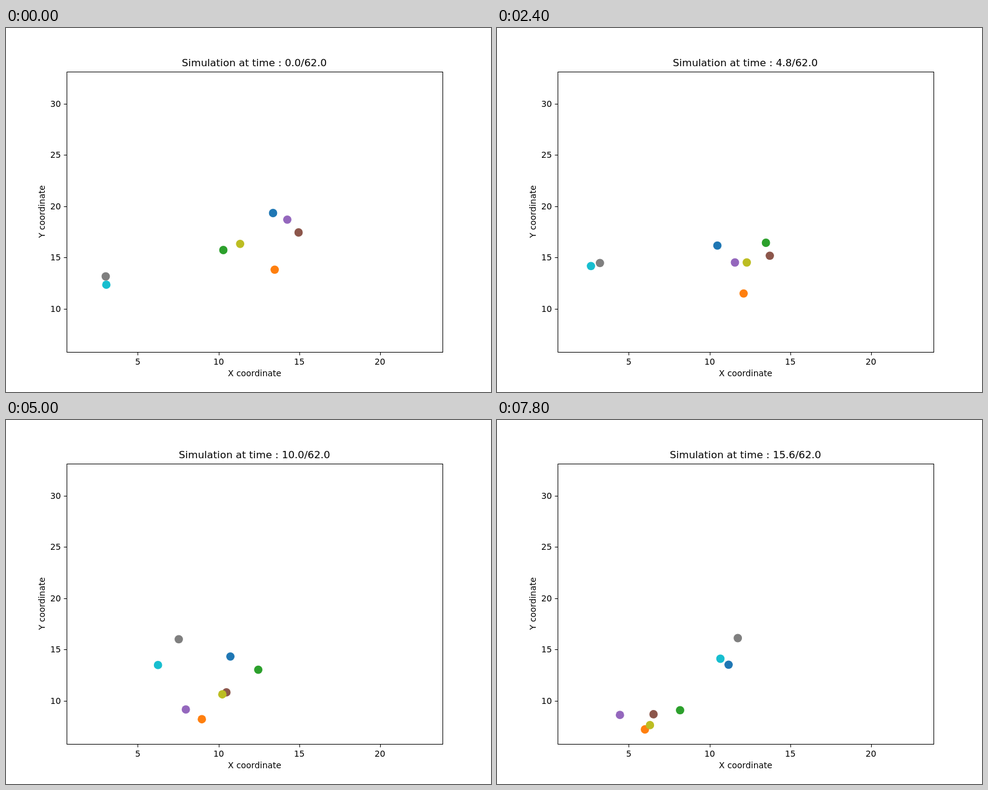
Write an HTML page that moves like this. It is 800 px wide and 600 px high and loops after 8000 ms.

```html
<!DOCTYPE html>
<html lang="en">
<head>
<meta charset="utf-8">
<title>Simulation</title>
<style>
  html, body { margin: 0; width: 100%; height: 100%; overflow: hidden; background: #fff; }
  svg { display: block; width: 800px; height: 600px; }
  text { font: 13.89px "DejaVu Sans", sans-serif; }
  .title { font-size: 16.67px; }
  .axis { fill: none; stroke: #000; }
</style>
</head>
<body>
<svg id="stage" viewBox="0 0 800 600"></svg>
<script>
const STEP_MS = 200, STEP_COUNT = 40, TIME_PER_STEP = 0.4;

// Every dot is at its waypoints at these steps and glides between them.
const WAYPOINT_STEPS = [0, 4, 12, 21, 33, 39];
const ROUTES = {
  '#1f77b4': '440.5,305 407.5,327 363.5,358.7 357.4,385 394,394.3 382,403.3',
  '#ff7f0e': '443.2,398.3 439.5,412 406.8,437.6 349.8,475.5 273.7,515.8 244,510',
  '#2ca02c': '358.5,366 400,356.5 443.6,354 439.2,389 349.5,455.5 302,478.4',
  '#9467bd': '464,315.8 444.5,336.5 392.5,386.5 332.2,447.7 227.8,511 202.8,486.2',
  '#8c564b': '482.6,337 479.2,340 450,375.3 397.5,424.3 293.2,486.2 258.2,485',
  '#7f7f7f': '164.5,409.5 136,396.5 169.8,387.3 241.7,368.6 368,355.6 397.2,359.5',
  '#bcbd22': '386.2,355.8 407.8,365.8 412,386.5 384.2,431.5 291,486.2 252.3,502.9',
  '#17becf': '165.5,423.2 127.7,404 155,392.3 211.8,399.2 333.5,406 368.5,393.5',
};

// Cubic spline whose curvature is constant over the first and last spans.
function spline(times, values) {
  const last = times.length - 1;
  const gap = i => times[i + 1] - times[i];
  const slope = i => (values[i + 1] - values[i]) / gap(i);
  const bend = times.map(() => 0);
  for (let pass = 0; pass < 60; pass++) {
    for (let i = 1; i < last; i++) {
      bend[i] = (6 * (slope(i) - slope(i - 1)) - gap(i - 1) * bend[i - 1] - gap(i) * bend[i + 1])
        / (2 * (gap(i - 1) + gap(i)));
    }
    bend[0] = bend[1];
    bend[last] = bend[last - 1];
  }
  return t => {
    let i = 0;
    while (i < last - 1 && t > times[i + 1]) i++;
    const h = gap(i), b = (t - times[i]) / h, a = 1 - b;
    return a * values[i] + b * values[i + 1]
      + ((a ** 3 - a) * bend[i] + (b ** 3 - b) * bend[i + 1]) * h * h / 6;
  };
}

const stage = document.getElementById('stage');

function add(name, attributes) {
  const node = document.createElementNS('http://www.w3.org/2000/svg', name);
  for (const key in attributes) node.setAttribute(key, attributes[key]);
  return stage.appendChild(node);
}

// Writes text so that it starts on a whole pixel; align is 0.5 for centred, 1 for right.
function write(node, text, x, align = 0.5) {
  node.textContent = text;
  node.setAttribute('x', Math.round(x - align * node.getComputedTextLength()));
}

const movers = Object.entries(ROUTES).map(([color, route]) => {
  const points = route.split(' ').map(pair => pair.split(',').map(Number));
  return {
    node: add('circle', { r: 6.9, fill: color }),
    xAt: spline(WAYPOINT_STEPS, points.map(p => p[0])),
    yAt: spline(WAYPOINT_STEPS, points.map(p => p[1])),
  };
});

for (let value = 5; value <= 20; value += 5) {
  const x = 84.25 + 26.64 * value;
  add('path', { class: 'axis', d: `M${Math.round(x) + 0.5} 534.5v5` });
  write(add('text', { y: 555 }), value, x);
}
for (let value = 10; value <= 30; value += 5) {
  const y = Math.round(631.7 - 16.89 * value);
  add('path', { class: 'axis', d: `M100.5 ${y + 0.5}h-5` });
  write(add('text', { y: y + 5 }), value, 90.3, 1);
}
add('rect', { class: 'axis', x: 100.5, y: 72.5, width: 620, height: 462 });
write(add('text', { y: 574 }), 'X coordinate', 410);
write(add('text', { y: 64, transform: 'rotate(-90)' }), 'Y coordinate', -303);
const title = add('text', { class: 'title', y: 63 });

function draw() {
  const step = Math.floor(performance.now() / STEP_MS) % STEP_COUNT;
  write(title, `Simulation at time : ${(step * TIME_PER_STEP).toFixed(1)}/62.0`, 410);
  for (const { node, xAt, yAt } of movers) {
    node.setAttribute('cx', xAt(step));
    node.setAttribute('cy', yAt(step));
  }
  requestAnimationFrame(draw);
}
draw();
</script>
</body>
</html>
```
